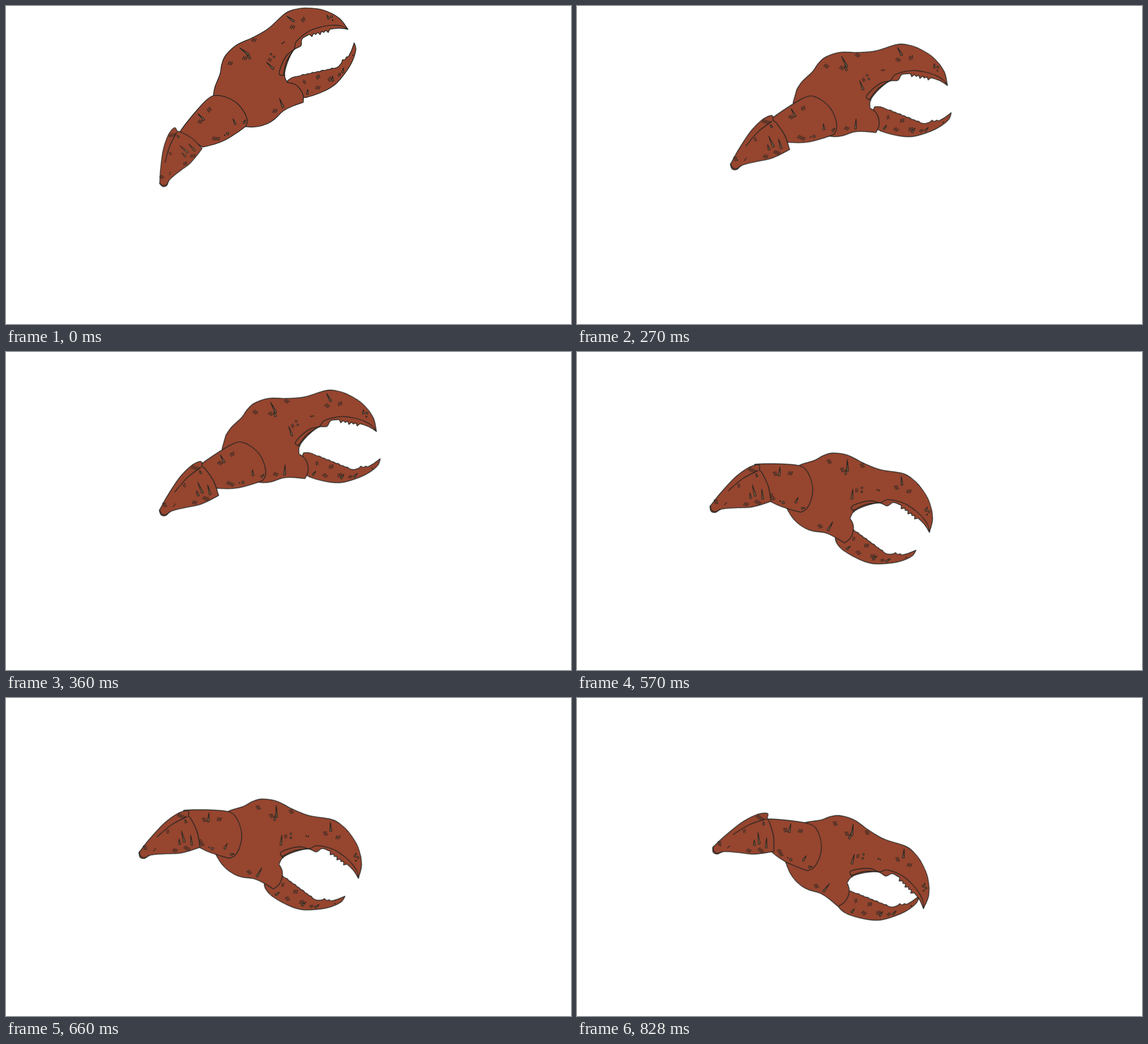
An HTML page for the animation above (0.9 s loop, 998x561 px).

```html
<!DOCTYPE html>
<html lang="en">
<head>
<meta charset="utf-8">
<title>Claw</title>
<style>
  html, body { margin: 0; width: 100%; height: 100%; overflow: hidden; background: #fff; }
  svg { display: block; }
  path { stroke: #17211f; stroke-width: 1.25; stroke-linejoin: round; stroke-linecap: round; }
  .shell { fill: #96452f; }
  .line { fill: none; }
  .mark { fill: #8d6242; stroke-width: 1.1; }
</style>
</head>
<body>
<svg id="stage" width="998" height="561" viewBox="0 0 998 561"></svg>
<script>
const LOOP = 900;
const STARTS = [0, 120, 270, 420, 570, 720];

// "x,y x,y ..." to a smooth run through the key points
function smooth(text) {
  const pts = text.split(' ').map(pair => pair.split(',').map(Number));
  const at = i => pts[Math.max(0, Math.min(pts.length - 1, i))];
  const handle = (i, side) => at(i).map((v, k) => v + side * (at(i + 1)[k] - at(i - 1)[k]) / 6);
  return `L${pts[0]}` + pts.slice(1).map((p, i) => `C${handle(i, 1)} ${handle(i + 1, -1)} ${p}`).join('');
}

// Saw edge between two points; every other tooth is shallower
function teeth([x1, y1], [x2, y2], count, depth) {
  const dx = (x2 - x1) / count, dy = (y2 - y1) / count, len = Math.hypot(dx, dy);
  let d = `L${x1} ${y1}`;
  for (let i = 0; i < count; i++) {
    const h = depth * (i % 2 ? .6 : 1) / len;
    d += `l${dx * .55 + dy * h} ${dy * .55 - dx * h}l${dx * .45 - dy * h} ${dy * .45 + dx * h}`;
  }
  return d;
}

const outline = (...runs) => runs.join('').replace('L', 'M') + 'Z';
const stroke = text => smooth(text).replace('L', 'M');

function polar(angle, r) {
  const a = angle * Math.PI / 180;
  return [r * Math.cos(a), r * Math.sin(a)];
}

// Teardrop from its tip, opening towards the angle
function drop([x, y, angle, len]) {
  const [ux, uy] = polar(angle, len), [wx, wy] = polar(angle + 90, 1.7);
  return `M${x} ${y}l${ux + wx} ${uy + wy}q${wy - wx} ${-wx - wy} ${-2 * wx} ${-2 * wy}Z`;
}

// Short parallel strokes centred on a point
function hatch([x, y, angle, count]) {
  const [ux, uy] = polar(angle, 3), [sx, sy] = polar(angle + 75, 2.8);
  return Array.from({ length: count }, (_, i) => {
    const k = i - (count - 1) / 2;
    return `M${x + k * sx - ux} ${y + k * sy - uy}l${2 * ux} ${2 * uy}`;
  }).join('');
}

const ring = ([x, y, r]) => `M${x - r} ${y}a${r} ${r} 0 1 1 ${2 * r} 0a${r} ${r} 0 1 1 ${-2 * r} 0Z`;

// Back to front. drops: x, y, angle, length; hatches: x, y, angle, count;
// rings: x, y, radius; poses: pivot x, pivot y, degrees, scale
const lowerFinger = {
  pivot: [568, 131.7],
  shell: outline(
    smooth('497,132 506,126 520,123'),
    teeth([520, 123], [580, 110], 7, 1.2),
    smooth('580,110 587,107 593,100'),
    teeth([593, 100], [605, 89], 2, 3),
    smooth('605,89 610,79 615,65'),
    smooth('615,65 618,77 612,97 600,117 582,138 558,152 525,162 504,157 497,132')),
  lines: [],
  drops: [[533, 147, 95, 8], [577, 123, 90, 9], [596, 109, 98, 8]],
  hatches: [[551, 125, 60, 3], [551, 144, -70, 3], [527, 134, 45, 2], [572, 129, 60, 3], [589, 121, -70, 2]],
  rings: [[613, 87, .6]],
  poses: [[568, 131.7, 0], [573, 167.3, 13.2], [584.7, 217.3, 34],
    [560, 267.3, 31.5], [517.7, 358.7, 48.5], [527.7, 378.7, 34]]
};

const palm = {
  pivot: [530.25, 101.75],
  shell: outline(
    smooth('366,160 369,143 378,120 381,103 388,87 407,69 437,55 463,40 492,14 510,6 531,3.5 560,7 588,21 604,41'),
    smooth('604,41 588,39 572,41'),
    teeth([572, 41], [536, 50], 5, 5),
    smooth('536,50 523,58 521,70 508,78 497,100 492,122 497,135'),
    smooth('497,135 510,138 520,147 525,158 525,170'),
    smooth('525,170 508,176 490,185 474,200 461,208 443,213 424,213 390,205 370,184')),
  lines: [
    stroke('604,41 592,35 574,34 556,37 540,42 524,52 512,64 509,76 496,87 486,106 483,121 493,122'),
    stroke('506,80 495,99 490,121')
  ],
  drops: [[496, 18, 35, 15], [413, 74, 37, 20], [424, 84, 50, 11], [460, 99, 44, 17], [483, 163, 68, 17], [567, 16, 65, 7]],
  hatches: [[525, 24, 58, 3], [506, 37, -60, 3], [438, 60, -62, 3], [396, 101, -65, 3],
    [422, 92, -65, 3], [466, 95, 36, 2], [475, 185, -75, 3]],
  rings: [[575, 19, 1.8], [577, 25, .9], [468, 85, 1.5], [473.5, 89.5, 1.5], [488, 66, .7], [491, 64, .7]],
  poses: [[530.25, 101.75, 0], [534.25, 123.75, 13.3], [561.75, 163.75, 25.1],
    [551.75, 207.5, 29.4], [529, 298.5, 51.3], [522.5, 338, 60]]
};

const wrist = {
  pivot: [390.25, 207.25],
  shell: outline(
    smooth('307,222 318,207 337,184 354,166 367,158 386,160 406,170 420,186 426,201 424,212'),
    smooth('424,212 409,223 388,236 368,244 347,249')),
  lines: [],
  drops: [[339, 190, 45, 15], [401, 199, 66, 10], [423, 201, 120, 6]],
  hatches: [[359, 183, 60, 3], [343, 204, -60, 3], [371, 234, -68, 5]],
  rings: [[391.5, 225, 2], [386, 228, .6]],
  poses: [[390.25, 207.25, 0], [400.75, 189, -2], [422.5, 212.5, 16.7],
    [391, 232, 31], [377.5, 253.5, 51], [392, 274, 56]]
};

const base = {
  pivot: [314, 233.25],
  shell: outline(
    smooth('261,283 269,256 283,220 297,197 308,186 316,183 319,191 325,194 344,212 358,235'),
    smooth('358,235 345,246 328,258 310,266 292,274 280,281 274,289 266,290 261,283')),
  lines: [stroke('261,281 265,287 273,288 280,281'), stroke('281,245 297,216 317,193')],
  drops: [[317, 220, 54, 20], [318, 235, 58, 9], [335, 221, 62, 17], [316, 199, 55, 5]],
  hatches: [[307, 196, -70, 5], [295, 230, 53, 2], [337, 245, -65, 4], [319, 256, -75, 3], [268, 271, -15, 3], [285, 268, -70, 1]],
  rings: [],
  poses: [[307.5, 259, -13.5, .9], [314, 233.25, 0], [333, 242.25, 12],
    [318.25, 243.5, 17.7], [302.25, 245.75, 21.4], [310.5, 247, 30]]
};

function add(parent, tag, attrs = {}) {
  const node = document.createElementNS('http://www.w3.org/2000/svg', tag);
  for (const key in attrs) node.setAttribute(key, attrs[key]);
  return parent.appendChild(node);
}

function build({ shell, lines, drops, hatches, rings }) {
  const group = add(document.getElementById('stage'), 'g');
  const draw = (cls, d) => add(group, 'path', { class: cls, d });
  draw('shell', shell);
  draw('line', lines.join(''));
  draw('mark', [...drops.map(drop), ...hatches.map(hatch), ...rings.map(ring)].join(''));
  return group;
}

function poseTransform([px, py], [x, y, turn, scale = 1]) {
  return `translate(${x}px, ${y}px) rotate(${turn}deg) scale(${scale}) translate(${-px}px, ${-py}px)`;
}

for (const part of [lowerFinger, palm, wrist, base]) {
  const steps = part.poses.map((pose, i) => ({
    offset: STARTS[i] / LOOP,
    transform: poseTransform(part.pivot, pose),
    easing: 'step-end'
  }));
  steps.push({ ...steps[steps.length - 1], offset: 1 });
  build(part).animate(steps, { duration: LOOP, iterations: Infinity });
}
</script>
</body>
</html>
```
